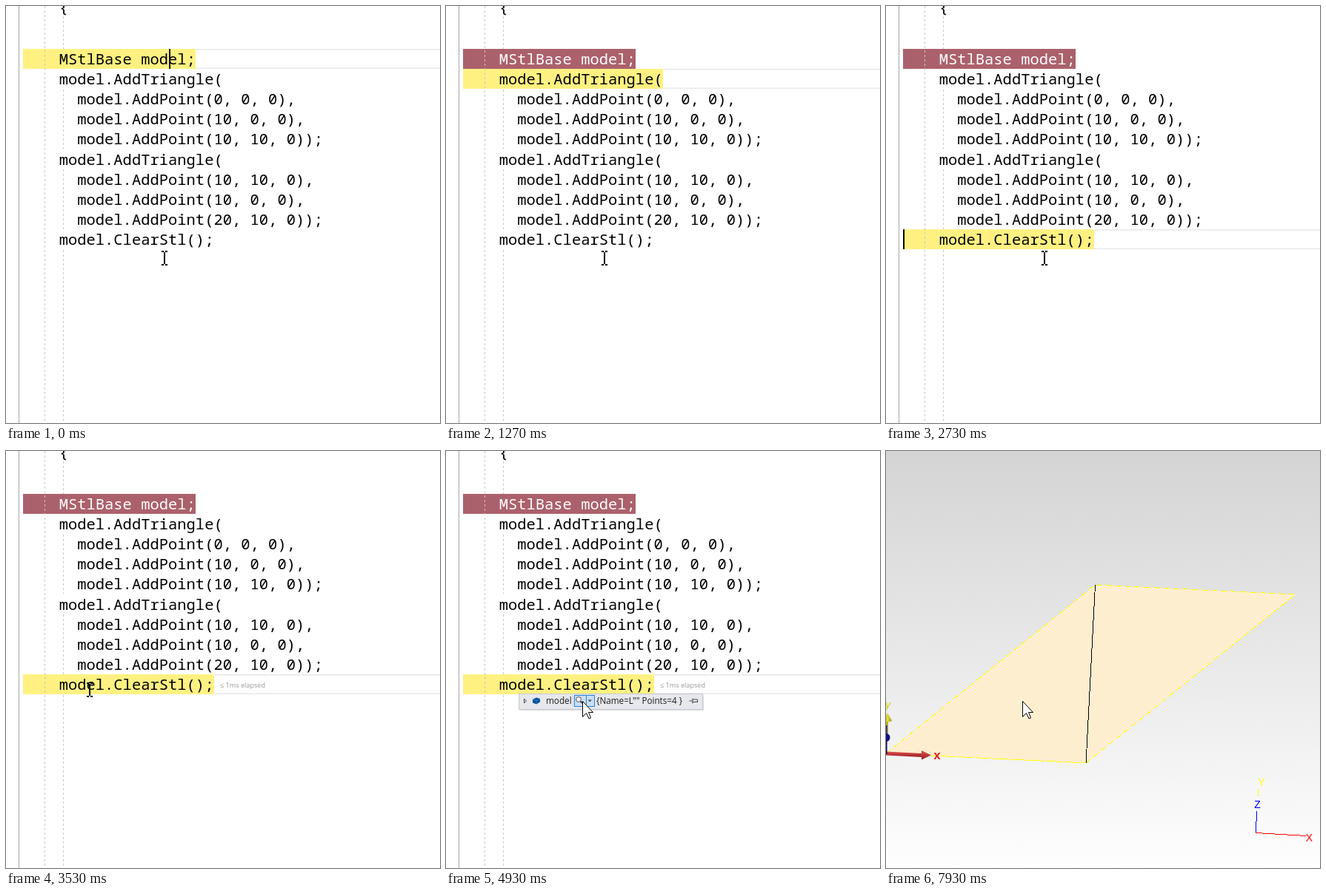
Write an HTML page that moves like this. It is 586 px wide and 564 px high and loops after 8000 ms.

```html
<!DOCTYPE html>
<html lang="en">
<head>
<meta charset="utf-8">
<title>Debugging a mesh</title>
<style>
  html, body { margin: 0; width: 100%; height: 100%; overflow: hidden; background: #fff; }
  svg { display: block; }
  text { white-space: pre; }
  .code { font: 20.48px "Noto Sans Mono", monospace; }
  .ui { font: 11.7px "Open Sans", sans-serif; fill: #1e1e1e; }
  .small { font: 9.1px "Open Sans", sans-serif; fill: #999; }
  .axis { font: 14px "Liberation Sans", sans-serif; text-anchor: middle; }
  .label { font: bold 17px "Liberation Sans", sans-serif; text-anchor: middle; }
  .crisp { shape-rendering: crispEdges; }
  .guide { stroke: #c8c8c8; stroke-dasharray: 3 3; }
</style>
</head>
<body>
<svg width="586" height="564" viewBox="0 0 586 564">
  <defs>
    <linearGradient id="sky" x2="0" y2="1"><stop stop-color="#d4d4d4"/><stop offset="1" stop-color="#fefefe"/></linearGradient>
    <linearGradient id="red" x2="0" y2="1"><stop stop-color="#e25050"/><stop offset="1" stop-color="#982020"/></linearGradient>
    <linearGradient id="gold"><stop stop-color="#8a8410"/><stop offset=".5" stop-color="#e6de40"/><stop offset="1" stop-color="#98921a"/></linearGradient>
  </defs>

  <g id="editor">
    <rect id="frame" x="24" width="600" height="25.5" fill="none" stroke="#e9e9ee" stroke-width="1.6"/>
    <rect id="stop" class="crisp" x="23" y="58" width="233" height="27" fill="#ab616b"/>
    <rect id="current" class="crisp" x="23" height="27" fill="#fff181"/>
    <path class="crisp" d="M17.5 0V564" stroke="#a5a5a5"/>
    <path class="crisp guide" d="M52.5 0V564M77.5 14V58M77.5 113V193M77.5 221V302M77.5 330V564"/>
    <g id="lines" class="code"></g>
    <text id="elapsed" class="small">≤ 1ms elapsed</text>
    <rect id="caret" class="crisp" width="2" height="27"/>

    <g id="tip">
      <rect x="100" y="330" width="248" height="21" fill="#000" opacity=".13"/>
      <rect x="98.5" y="328.5" width="248" height="21" fill="#e7e8ec" stroke="#c6c8d2"/>
      <path d="M105.5 335v6l3-3z" fill="none" stroke="#444"/>
      <path d="M117 336l5-2.5 5 1.5v4.5l-5 3-5-2z" fill="#00539c"/>
      <path d="M117 336l5 1.5 5-2.5M122 337.500v4.500" fill="none" stroke="#5d95c8" stroke-width=".6"/>
      <path d="M171.500 331v15" stroke="#d0d2da"/>
      <g id="hover" class="crisp" fill="#c9def5" stroke="#2286d2">
        <rect x="173.500" y="330.500" width="16" height="15"/><rect x="189.500" y="330.500" width="11" height="15"/>
      </g>
      <circle cx="179" cy="336" r="3.400" fill="#f6f6f6" stroke="#555"/>
      <path d="M181.500 338.500l4 3.500" stroke="#444" stroke-width="2"/>
      <path d="M191.500 336.500h5.500l-2.750 3z" fill="#555"/>
      <text class="ui" x="135" y="342">model</text>
      <text class="ui" x="203" y="342">{Name=L"" Points=4 }</text>
      <path id="pin" d="M328.500 338h4M333 334.500v7M333 336h6.500v3.500H333M333 339.500h7" fill="none"/>
    </g>
  </g>

  <g id="viewer">
    <rect width="586" height="564" fill="url(#sky)"/>
    <g id="mesh">
      <path d="M0 409L282.500 181 553 194 270 422z" fill="#feeed0"/>
      <path class="crisp" d="M0 409L282.500 181 553 194 270 422" fill="none" stroke="#ff0" stroke-dasharray="9 4"/>
      <path class="crisp" d="M0 409L270 422" stroke="#ff0" stroke-dasharray="22 2"/>
      <path class="crisp" d="M282.500 181L270 422" stroke="#000"/>
    </g>
    <g id="triad">
      <path d="M5.500 394V373" stroke="#b8b020" stroke-width="3"/>
      <path d="M4.500 392V380" stroke="#2020a0" stroke-width="2"/>
      <path d="M6 363l6 11q-6 3-12 0z" fill="url(#gold)"/>
      <path d="M3 415.500l49 2.500v5l-49-2.500z" fill="url(#red)"/>
      <path d="M52 414l13 6.500-13 6z" fill="url(#red)"/>
      <path d="M3.500 419V400" stroke="#0c0c58" stroke-width="4"/>
      <circle cx="4" cy="396.500" r="5.500" fill="#12127e"/>
      <text class="label" x="73" y="426" fill="#e02020">x</text>
      <text class="label" x="6.500" y="357" fill="#d8d010" style="font-size:15px;font-style:italic;font-weight:400">y</text>
    </g>
    <g class="crisp" fill="none">
      <path d="M499.500 516.500L567 520.500" stroke="#f00"/>
      <path d="M499.500 516V504M502.500 467V457" stroke="#ff0"/>
      <path d="M499.500 516L500.500 487" stroke="#00f"/>
    </g>
    <g class="axis">
      <text x="571.500" y="528" fill="#f00">X</text>
      <text x="507" y="453" fill="#ff0">Y</text>
      <text x="501.500" y="483" fill="#00f">Z</text>
    </g>
  </g>

  <g id="mouse">
    <path id="beam" class="crisp" d="M0-8V8M-4-9H-1M1-9H4M-4 9H-1M1 9H4" stroke="#000" stroke-width="2"/>
    <path id="arrow" d="M.500.500V21.500L5.500 16.500 9 24 11.500 23 8.500 15.500H14.500z" fill="#fff" stroke="#000"/>
    <path id="glass" d="M16 5.500H26M16 20.500H26M17.500 6V9L24.500 17V20M24.500 6V9L17.500 17V20M19 9h4M20 18h3" fill="none" stroke="#000" stroke-width="1.500"/>
  </g>
</svg>
<script>
const LOOP = 8000, PITCH = 27.12, CHAR = 12.288, LEFT = 23;
const $ = id => document.getElementById(id);
const set = (id, attrs) => { for (const k in attrs) $(id).setAttribute(k, attrs[k]); };
const show = (id, on) => set(id, { visibility: on ? 'inherit' : 'hidden' });
const within = (t, spans) => spans.some(([a, b]) => t >= a && t < b);
const lineTop = n => Math.round(58 + n * PITCH);

const code = [
  'MStlBase model;',
  'model.AddTriangle(',
  '  model.AddPoint(0, 0, 0),',
  '  model.AddPoint(10, 0, 0),',
  '  model.AddPoint(10, 10, 0));',
  'model.AddTriangle(',
  '  model.AddPoint(10, 10, 0),',
  '  model.AddPoint(10, 0, 0),',
  '  model.AddPoint(20, 10, 0));',
  'model.ClearStl();'
];

function addLine(str, y) {
  const el = document.createElementNS('http://www.w3.org/2000/svg', 'text');
  const indent = str.length - str.trimStart().length;
  el.setAttribute('x', LEFT + (4 + indent) * CHAR - 0.5);
  el.setAttribute('y', y);
  el.textContent = str.trim();
  $('lines').append(el);
  return el;
}
addLine('{', 9);
const firstLine = code.map((str, i) => addLine(str, lineTop(i) + 21))[0];

const caretOn = [[0, 200], [730, 1270], [1930, 2470], [2730, 3270], [3800, 4130], [4470, 4870]];
const elapsedOn = [[1670, 1870], [2400, 2670], [2930, 6000]];
// time, x, y of the pointer
const path = [[0, 214, 341], [2930, 214, 341], [3600, 110, 322], [3830, 110, 322],
  [4200, 180, 347], [4530, 184, 338], [LOOP, 184, 338]];

function pointer(t) {
  const i = path.findIndex(p => p[0] > t);
  const [t0, x0, y0] = path[i - 1], [t1, x1, y1] = path[i];
  const u = (t - t0) / (t1 - t0), e = u * u * (3 - 2 * u);
  return [x0 + (x1 - x0) * e, y0 + (y1 - y0) * e].map(Math.round);
}

function draw(t) {
  const viewing = t >= 6000, done = t >= 7930;
  const line = t < 1270 ? 0 : t < 1870 ? 1 : t < 2670 ? 5 : 9;
  const top = lineTop(line), width = Math.round((code[line].length + 4) * CHAR);
  const tip = t >= 3800, hover = t >= 4470;

  show('editor', !viewing);
  show('viewer', viewing);
  show('stop', line > 0);
  firstLine.setAttribute('fill', line ? '#fff' : '#000');
  set('current', { y: top, width });
  set('frame', { y: top + 0.8 });
  set('caret', { x: line ? 23 : 220, y: top });
  show('caret', within(t, caretOn));
  set('elapsed', { x: LEFT + width + 10 - (line === 9 ? 2 : 3), y: top + 18 });
  show('elapsed', within(t, elapsedOn));
  show('tip', tip);
  show('hover', hover);
  set('pin', { stroke: hover ? '#444' : '#999' });

  show('mesh', done);
  set('triad', { transform: done ? 'translate(-4 -9)' : '' });

  const [x, y] = pointer(t), arrow = tip && y > 328;
  set('mouse', { transform: `translate(${x} ${y})` });
  show('beam', !arrow && !within(t, [[1470, 1530]]));
  show('arrow', arrow);
  show('glass', viewing && !done);
}

function tick(now) {
  draw(now % LOOP);
  requestAnimationFrame(tick);
}
draw(0);
requestAnimationFrame(tick);
</script>
</body>
</html>
```
